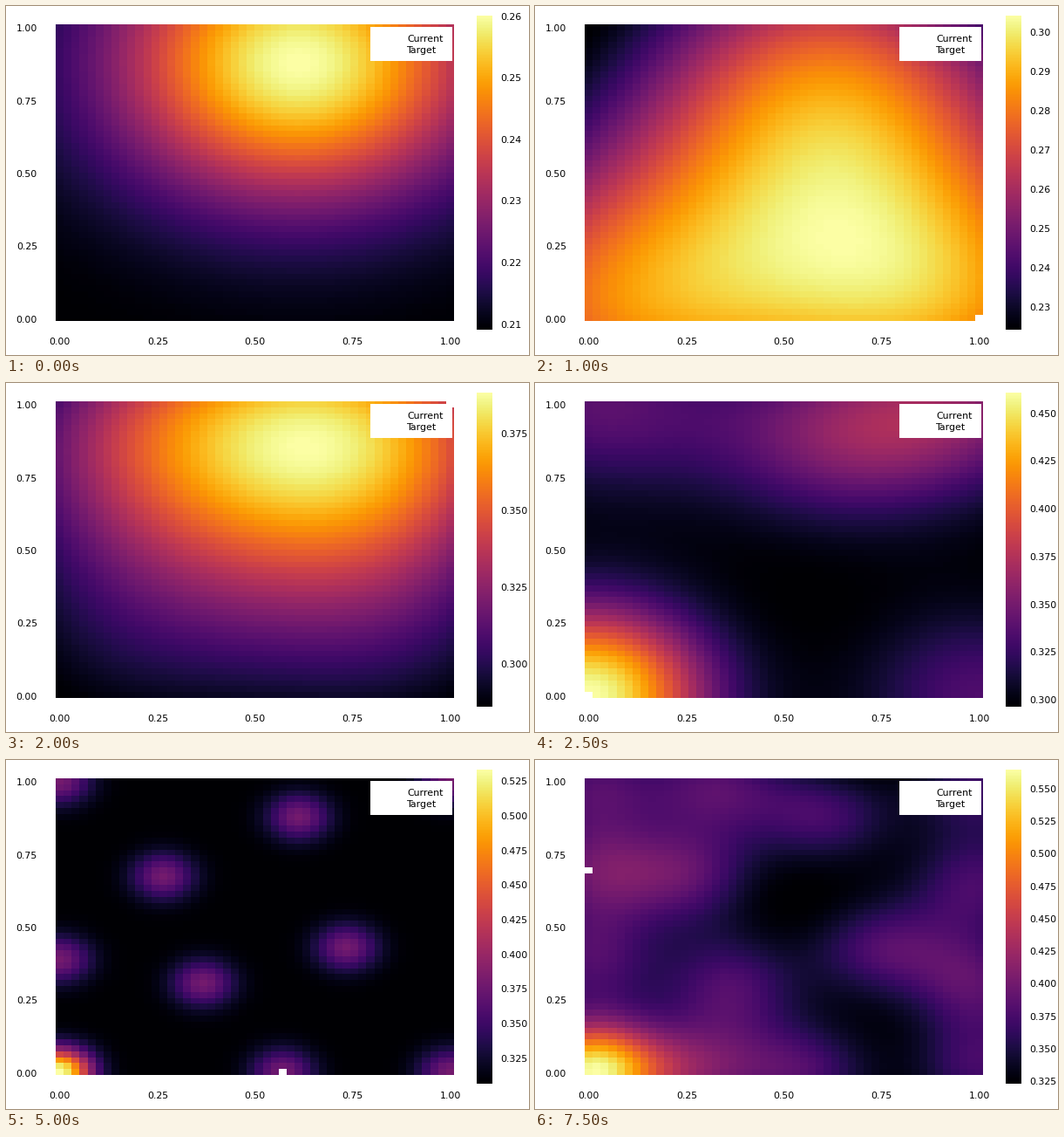
These frames come from a looping animation (600x400 px, 8 s). A matplotlib script:

```python
from itertools import product

import numpy as np
import matplotlib.pyplot as plt
from matplotlib.animation import FuncAnimation
from matplotlib.patches import Rectangle

W, H = 600, 400
N = 50
LEFT, RIGHT, TOP, BOTTOM = 57, 514, 21, 361
BAR_TOP, BAR_BOTTOM = 11, 371
STEP_MS = 500
FONT = dict(family="DejaVu Sans", size=7.9, color="black")

# Sampled cells (column, row), one more per step: a first guess, the four
# corners, the origin again, then a spread over the square
corners = [(c, r) for r, c in product((0, N - 1), repeat=2)]
samples = [(30, 43), *corners, (0, 0), (0, 19), (13, 33), (18, 15), (36, 21),
           (28, 0), (49, 32), (16, 49), (49, 15), (14, 0), (0, 34)]
weights = np.ones(len(samples))
weights[5] = 1.4
SHARPNESS = 1.3

# Steps at which the model is refitted, linear in between
KEYS = [0, 2, 4, 6, 9, 10, 14, 15]
SCALE = [0.39, 0.47, 0.47, 0.051, 0.051, 0.065, 0.065, 0.14]
LOW = [0.2091, 0.2242, 0.2860, 0.3067, 0.3067, 0.3067, 0.3067, 0.3230]
HIGH = [0.2601, 0.3042, 0.3883, 0.5332, 0.5332, 0.5332, 0.5332, 0.5648]

axis = np.linspace(0, 1, N)


def surface(step):
    """Weighted sum of Gaussians scaled to 0..1, with the newest cell blank."""
    scale = np.interp(step, KEYS, SCALE)
    bell = np.exp(-(axis[:, None] - axis) ** 2 / (2 * scale ** 2))
    z = sum(w * np.outer(bell[r], bell[c])
            for w, (c, r) in zip(weights, samples[:step + 1]))
    z = ((z - z.min()) / (z.max() - z.min())) ** SHARPNESS
    if step > 0:
        c, r = samples[step]
        z[r, c] = np.nan
    return z


fig = plt.figure(figsize=(W / 100, H / 100), dpi=100, facecolor="white")
ax = fig.add_axes([0, 0, 1, 1])
ax.axis("off")

cmap = plt.get_cmap("inferno").copy()
cmap.set_bad("white")
style = dict(cmap=cmap, vmin=0, vmax=1, origin="lower", aspect="auto",
             interpolation="nearest")
heat = ax.imshow(surface(0), extent=(LEFT, RIGHT, BOTTOM, TOP), **style)
ax.imshow(np.linspace(0, 1, 256)[:, None],
          extent=(540, 558, BAR_BOTTOM, BAR_TOP), **style)
ax.set_xlim(0, W)
ax.set_ylim(H, 0)

ax.add_patch(Rectangle((418, 24), 94, 38.5, fc="white", ec="none", zorder=3))
for name, y in (("Current", 41), ("Target", 54)):
    ax.text(460, y, name, va="baseline", zorder=4, **FONT)

cell_w, cell_h = (RIGHT - LEFT) / N, (BOTTOM - TOP) / N
for v in np.linspace(0, 1, 5):
    x = LEFT + cell_w * (0.5 + v * (N - 1))
    y = BOTTOM - cell_h * (0.5 + v * (N - 1))
    ax.text(x + 0.3, 384.5, f"{v:.2f}", ha="center", va="center", **FONT)
    ax.text(36, y + 2, f"{v:.2f}", ha="right", va="center", **FONT)

bar_labels = [ax.text(567, 0, "", va="center", **FONT) for _ in range(12)]


def draw(step):
    heat.set_data(surface(step))
    lo, hi = np.interp(step, KEYS, LOW), np.interp(step, KEYS, HIGH)
    tick, digits = (0.01, 2) if hi - lo < 0.1 else (0.025, 3)
    ticks = np.arange(np.ceil(lo / tick), np.floor(hi / tick) + 1) * tick
    for label in bar_labels:
        label.set_text("")
    for label, v in zip(bar_labels, ticks):
        label.set_text(f"{v:.{digits}f}")
        label.set_y(BAR_BOTTOM + 1 - (v - lo) / (hi - lo) * (BAR_BOTTOM - BAR_TOP))
    return [heat, *bar_labels]


anim = FuncAnimation(fig, draw, frames=len(samples), interval=STEP_MS,
                     repeat=True, repeat_delay=0)
plt.show()
```
